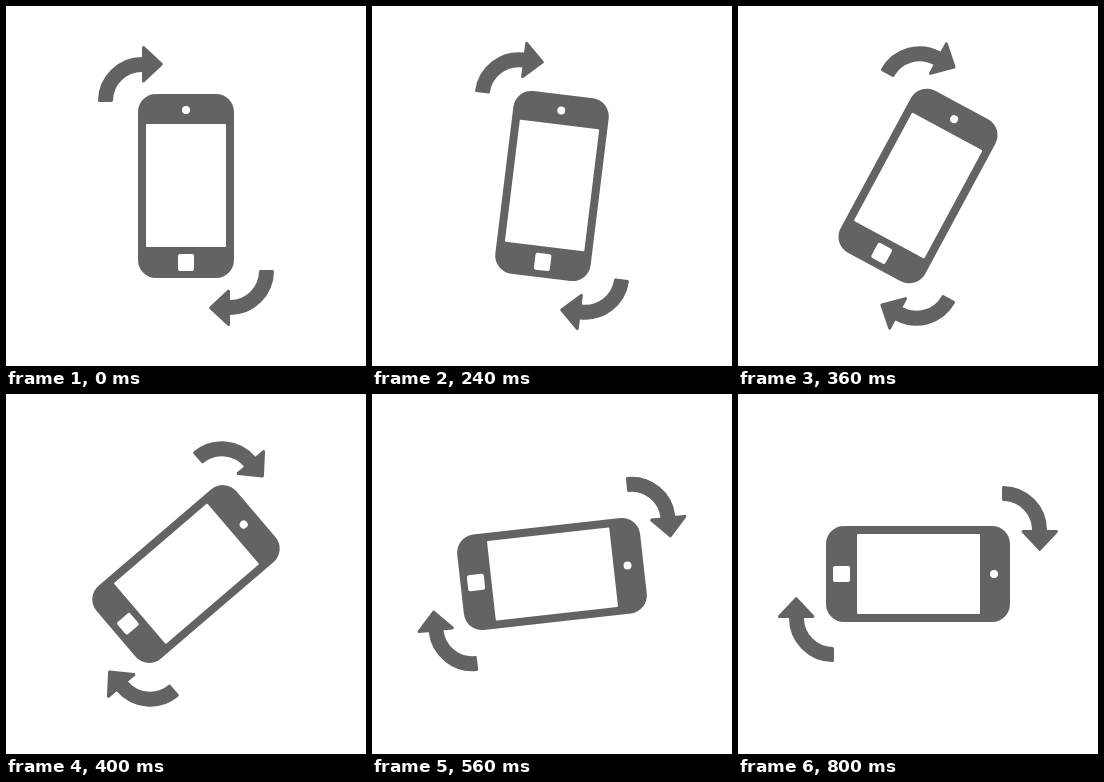
An HTML page that plays this animation: 360 by 360 pixels, repeating every 4000 ms.

```html
<!DOCTYPE html>
<html lang="en">
<head>
<meta charset="utf-8">
<title>Rotate phone</title>
<style>
  html, body { margin: 0; width: 100%; height: 100%; overflow: hidden; background: #fff; }
  svg { display: block; width: 100%; height: 100%; }
</style>
</head>
<body>
<svg viewBox="0 0 360 360">
  <defs>
    <path id="arrow" stroke="#636363" stroke-width="3" stroke-linejoin="round"
      d="M93.5 94.5A42.5 42.5 0 0 1 136 52.5H137.5V41.5L155.3 58.2 137.5 75V64.5H136A30.5 30.5 0 0 0 105.5 94.5Z"/>
  </defs>
  <g id="device" fill="#636363">
    <use href="#arrow"/>
    <use href="#arrow" transform="rotate(180 180 180)"/>
    <rect x="132" y="88" width="96" height="184" rx="18"/>
    <g fill="#fff">
      <rect x="140" y="118" width="80" height="123" rx="1"/>
      <circle cx="180" cy="104" r="4"/>
      <rect x="172" y="248" width="16" height="17" rx="2"/>
    </g>
  </g>
</svg>
<script>
  const LOOP = 4000, TURN = 800, STEP = 40;
  const device = document.getElementById('device');

  const bezier = (s, a, b) => 3 * (1 - s) ** 2 * s * a + 3 * (1 - s) * s * s * b + s ** 3;

  // Cubic Bezier easing (0.8, 0, 0.175, 1), solved by bisection.
  function ease(p) {
    if (p <= 0 || p >= 1) return p <= 0 ? 0 : 1;
    let low = 0, high = 1;
    for (let i = 0; i < 30; i++) {
      const mid = (low + high) / 2;
      if (bezier(mid, 0.8, 0.175) < p) low = mid; else high = mid;
    }
    return bezier(low, 0, 1);
  }

  function draw(time) {
    const t = Math.floor((time % LOOP) / STEP) * STEP;
    const angle = 90 * ease(t / TURN);
    device.setAttribute('transform', `rotate(${angle.toFixed(3)} 180 180)`);
  }

  const start = performance.now();
  function tick() {
    draw(performance.now() - start);
    requestAnimationFrame(tick);
  }
  tick();
</script>
</body>
</html>
```
